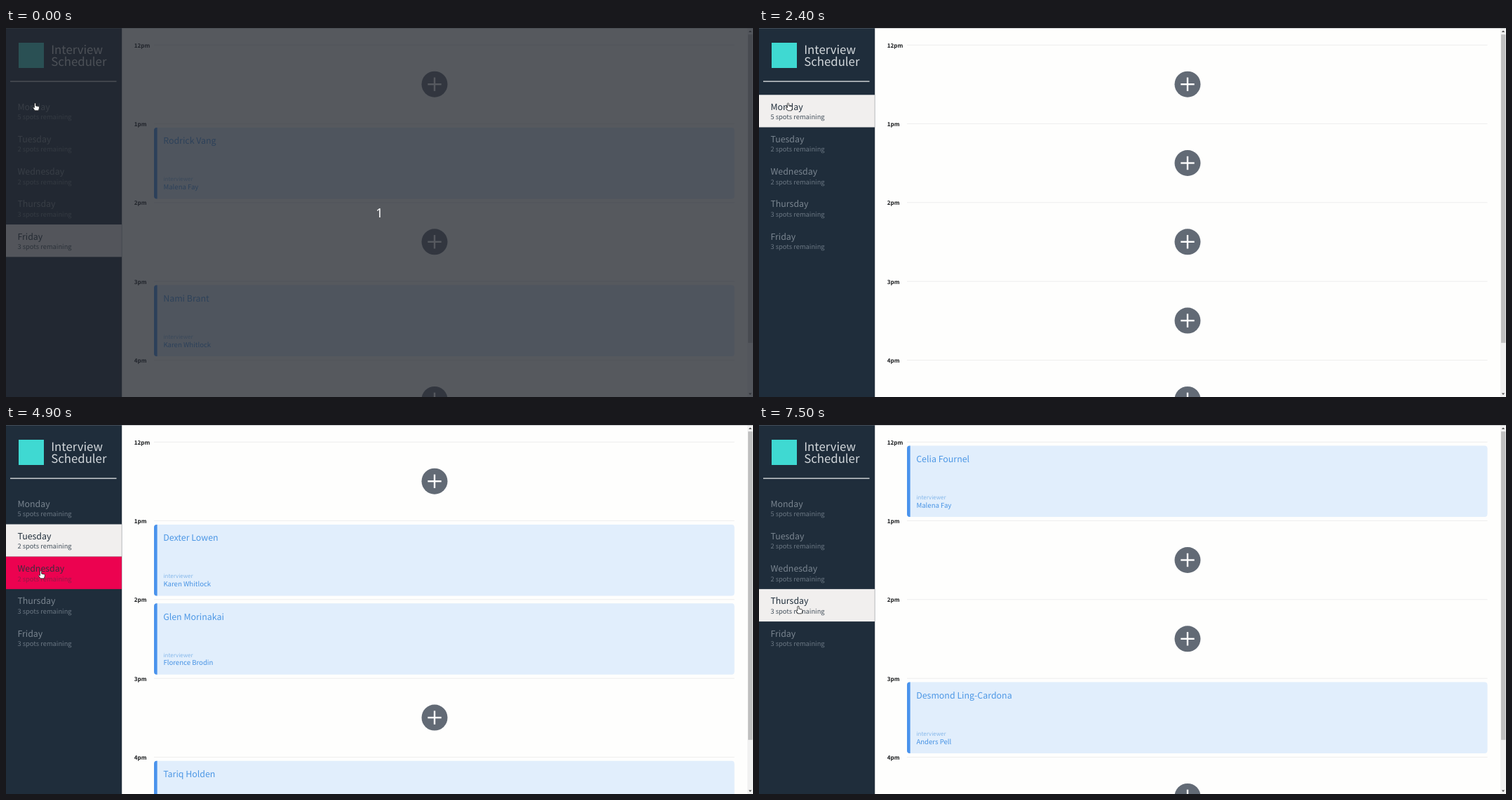
Recreate the animation shown at these times as an HTML page with a canvas. Size 1065 by 526 pixels, loop 8 s.

```html
<!DOCTYPE html>
<html lang="en">
<head>
<meta charset="utf-8">
<title>Interview Scheduler</title>
<style>
  html, body { margin: 0; width: 100%; height: 100%; overflow: hidden; background: #fefefd; }
  canvas { display: block; }
</style>
</head>
<body>
<canvas id="stage" width="1065" height="526"></canvas>
<script>
const W = 1065, H = 526, LOOP = 8000;
const SIDEBAR = 165, ROW_TOP = 95.3, ROW_H = 46.2;
const SLOT_TOP = 24.4, SLOT_H = 112.3;
const FONT = '"Noto Sans CJK JP", "Noto Sans CJK SC", "Noto Sans CJK", "Noto Sans", sans-serif';
const ctx = document.getElementById('stage').getContext('2d');

// Each booking: hour index -> [student, interviewer]
const days = [
  { name: 'Monday', spots: 5, booked: {} },
  { name: 'Tuesday', spots: 2, booked: {
    1: ['Dexter Lowen', 'Karen Whitlock'],
    2: ['Glen Morinakai', 'Florence Brodin'],
    4: ['Tariq Holden', ''] } },
  { name: 'Wednesday', spots: 2, booked: {
    0: ['Ambrose Thornel', 'Cleo Barstow'],
    3: ['Evan Corderos', 'Anders Pell'],
    4: ['Nadia Porter-Heath', ''] } },
  { name: 'Thursday', spots: 3, booked: {
    0: ['Celia Fournel', 'Malena Fay'],
    3: ['Desmond Ling-Cardona', 'Anders Pell'] } },
  { name: 'Friday', spots: 3, booked: {
    1: ['Rodrick Vang', 'Malena Fay'],
    3: ['Nami Brant', 'Karen Whitlock'] } }
];
const hours = ['12pm', '1pm', '2pm', '3pm', '4pm'];

// Pointer hotspot over time: [ms, x, y]
const pointerPath = [
  [0, 41.5, 107], [2400, 41.5, 107], [3100, 39, 162.7],
  [4300, 39, 162.7], [4600, 45, 193], [4700, 45, 193], [4900, 49.5, 208],
  [6100, 49.5, 208], [6800, 56, 258], [LOOP, 56, 258]
];

function pointerAt(time) {
  const t = Math.floor(time / 100) * 100;
  const i = Math.max(1, pointerPath.findIndex(p => p[0] >= t));
  const [t0, x0, y0] = pointerPath[i - 1], [t1, x1, y1] = pointerPath[i];
  const k = (t - t0) / (t1 - t0);
  return { x: x0 + (x1 - x0) * k, y: y0 + (y1 - y0) * k };
}

function selectedAt(t) {
  if (t < 1600) return 4;
  return [3600, 5600, 7500].filter(click => t >= click).length;
}

function rect(x, y, w, h, color) {
  ctx.fillStyle = color;
  ctx.fillRect(x, y, w, h);
}

function text(str, x, y, size, color, weight = 400) {
  ctx.font = `${weight} ${size}px ${FONT}`;
  ctx.fillStyle = color;
  ctx.fillText(str, x, y);
}

function drawSidebar(selected, hovered) {
  rect(0, 0, SIDEBAR, H, '#1f2d3b');
  rect(18, 21, 36, 36, '#3fd9d2');
  text('Interview', 64.2, 37, 16.8, '#d3d8dc', 300);
  text('Scheduler', 64.2, 53.7, 16.8, '#d3d8dc', 300);
  rect(6, 75.5, 151.5, 1.2, '#f4f5f5');

  days.forEach((day, i) => {
    const y = ROW_TOP + i * ROW_H;
    let title = '#7a8590', note = '#6b7783';
    if (i === selected) {
      rect(0, y, SIDEBAR, ROW_H, '#f1efee');
      title = '#22303d';
      note = '#46525d';
    } else if (i === hovered) {
      rect(0, y, SIDEBAR, ROW_H, '#ec0250');
      title = '#3f2b3c';
      note = '#941c48';
    }
    text(day.name, 16.4, y + 21.4, 12.4, title);
    text(`${day.spots} spots remaining`, 16.4, y + 34.8, 9.35, note, 300);
  });
  rect(SIDEBAR - 0.3, 0, 1, H, 'rgba(60,70,80,.35)');
}

function drawAddButton(y) {
  ctx.fillStyle = '#626a75';
  ctx.beginPath();
  ctx.arc(611, y, 18.5, 0, Math.PI * 2);
  ctx.fill();
  rect(601.3, y - 1.2, 19.4, 2.4, '#fff');
  rect(609.8, y - 9.7, 2.4, 19.4, '#fff');
}

function drawBooking(y, [student, interviewer]) {
  ctx.save();
  ctx.beginPath();
  ctx.roundRect(211, y + 5.2, 827.5, 101.5, 4);
  ctx.clip();
  rect(211, y, 828, SLOT_H, '#e1eefc');
  rect(211, y, 4.6, SLOT_H, '#4a93ec');
  ctx.restore();
  text(student, 224.2, y + 28.7, 12.4, '#4c97e5');
  text('interviewer', 224.4, y + 81.6, 7.95, '#86b8ea', 300);
  text(interviewer, 224.4, y + 93.3, 9.6, '#4793e4');
}

function drawSchedule(day) {
  rect(SIDEBAR, 0, W - SIDEBAR, H, '#fefefd');
  hours.forEach((hour, i) => {
    const y = SLOT_TOP + i * SLOT_H;
    text(hour, 182.8, y + 3.2, 8.1, '#17191b', 700);
    rect(211, y - 0.6, 827.5, 0.9, '#ececec');
    if (day.booked[i]) drawBooking(y, day.booked[i]);
    else drawAddButton(y + 55.8);
  });
}

function drawArrow(y, dir) {
  ctx.fillStyle = '#505050';
  ctx.beginPath();
  ctx.moveTo(1058.8, y + dir);
  ctx.lineTo(1063.2, y + dir);
  ctx.lineTo(1061, y - 1.4 * dir);
  ctx.fill();
}

function drawScrollbar() {
  rect(1057, 0, 8, H, '#f1f1f1');
  rect(1058, 9.3, 6.4, 439.5, '#bfbfbf');
  drawArrow(5, 1);
  drawArrow(521.5, -1);
}

function drawHand({ x, y }) {
  ctx.save();
  ctx.translate(x, y);
  ctx.beginPath();
  ctx.moveTo(-1.1, 0.8);
  ctx.quadraticCurveTo(0, -0.8, 1.1, 0.8);
  ctx.lineTo(1.1, 4);
  ctx.lineTo(5, 4.8);
  ctx.quadraticCurveTo(6.2, 5.2, 6, 7);
  ctx.lineTo(4.8, 10.8);
  ctx.lineTo(-0.4, 10.8);
  ctx.lineTo(-3.3, 6.6);
  ctx.quadraticCurveTo(-3, 5, -1.1, 6.7);
  ctx.closePath();
  ctx.fillStyle = '#fff';
  ctx.strokeStyle = '#1c1c1c';
  ctx.lineWidth = 0.8;
  ctx.lineJoin = 'round';
  ctx.fill();
  ctx.stroke();
  ctx.restore();
}

function drawBeam({ x, y }) {
  const color = '#b3a4a8';
  rect(x - 1.5, y - 3.5, 1, 9, color);
  rect(x - 3.5, y - 4, 5, 0.8, color);
  rect(x - 3.5, y + 5.2, 5, 0.8, color);
}

function draw(t) {
  const intro = t < 100;
  const pointer = pointerAt(t);
  const hovered = intro ? -1 : Math.floor((pointer.y - ROW_TOP) / ROW_H);
  const selected = selectedAt(t);

  drawSchedule(days[selected]);
  drawSidebar(selected, hovered);
  drawScrollbar();
  rect(0, 0, W, 1, 'rgba(120,125,130,.4)');

  if (intro) {
    rect(0, 0, W, H, 'rgba(36,40,47,.77)');
    ctx.font = '18px "Noto Sans", "Open Sans", sans-serif';
    ctx.fillStyle = '#fff';
    ctx.textAlign = 'center';
    ctx.fillText('1', 532.5, 269.5);
    ctx.textAlign = 'left';
  }
  const beam = (t >= 1400 && t < 1600) || (t >= 3300 && t < 3600);
  (beam ? drawBeam : drawHand)(pointer);
}

ctx.textRendering = 'geometricPrecision';
const start = performance.now();
function tick() {
  draw((performance.now() - start) % LOOP);
  requestAnimationFrame(tick);
}
tick();
</script>
</body>
</html>
```
